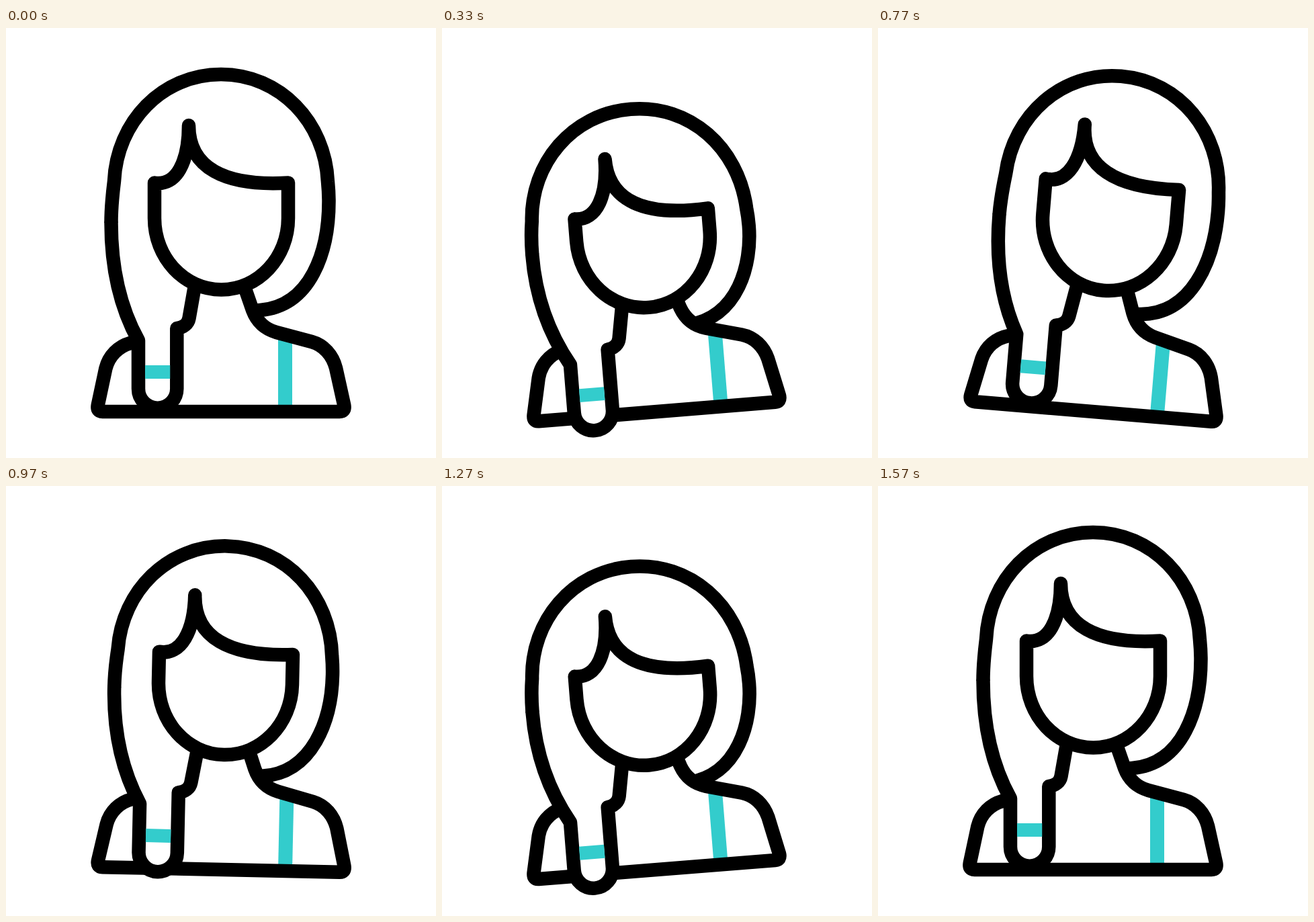
An HTML page that plays this animation: 640 px wide and 640 px high, repeating every 2 s.

```html
<!DOCTYPE html>
<html lang="en">
<head>
<meta charset="utf-8">
<title>Woman</title>
<style>
html, body { margin: 0; height: 100%; overflow: hidden; background: #fff; }
svg { display: block; width: 100vw; height: 100vh; }
.line { fill: none; stroke: #000; stroke-width: 20.5; stroke-linejoin: round; }
.solid { fill: #fff; }
.teal { fill: #33cccc; }
</style>
</head>
<body>
<svg viewBox="0 0 640 640">
  <defs>
    <path id="torso" d="M202 465L185 469C167 474 153 488 148.3 507L136.7 561.5Q135 571 143.5 571H496.5Q505 571 503.3 561.5L491 506C486 487 473 472 455 467L402.5 453C385 448 373 436 367 420L350 371"/>
  </defs>
  <g id="figure">
    <g class="head"><path id="cap" class="line"/></g>
    <use href="#torso" class="solid"/>
    <path class="teal" d="M405 455H426V565H405Z"/>
    <use href="#torso" class="line"/>
    <g class="head">
      <path id="braid" class="line solid" stroke-linecap="round"/>
      <path class="teal" d="M207 502H244.2V522H207Z"/>
      <path id="face" class="line solid"/>
    </g>
  </g>
</svg>
<script>
const $ = id => document.getElementById(id);
const heads = document.querySelectorAll('.head');

// Key poses: time in frames, tilt in degrees, amount of head squash
const FPS = 30, LOOP = 2000;
const keys = [[0, 0, 0], [12, -5, 1], [24, 5, 0], [36, -5, 1], [47, 0, 0]];

function pose(frame) {
  const i = keys.findIndex(k => k[0] > frame);
  if (i < 0) return [0, 0];
  const a = keys[i - 1], b = keys[i];
  const p = (frame - a[0]) / (b[0] - a[0]);
  const e = p * p * (3 - 2 * p);
  return [1, 2].map(n => a[n] + (b[n] - a[n]) * e);
}

function draw(frame) {
  const [tilt, k] = pose(frame);
  $('figure').setAttribute('transform', `rotate(${tilt} 320 571)`);
  heads.forEach(h => h.setAttribute('transform', `translate(0 ${28 * k})`));

  // The crown sinks further than the chin
  const top = 69 + 26 * k, ctrl = 140 + 24 * k, dx = -3 * k;
  const rx = 480.5 - 2 * k, ry = 258 + 24 * k, rside = 229 + 27 * k;
  const lx = 156.5 - 3 * k, ly = 290 + 8 * k, lside = 228 + 21 * k;
  $('cap').setAttribute('d',
    `M364 421L378 420C${454 - 2 * k} 414 ${rx} ${332 + 6 * k} ${rx} ${ry}` +
    `Q${rx} ${ry - 14} ${479 - 2 * k} ${rside}` +
    `C${475 + dx} ${ctrl} ${408 + dx} ${top} ${320 + dx} ${top}` +
    `S${165 + dx} ${ctrl} ${161 - 4 * k} ${lside}` +
    `C${158.5 - 4 * k} ${lside + 20 - 4 * k} ${lx} ${ly - 20} ${lx} ${ly}`);
  $('braid').setAttribute('d',
    `M${lx} ${ly}C${lx} ${360 + 3 * k} ${171 - k} 418 197 465V537` +
    'A28.65 28.65 0 0 0 254.3 537V447C264 446 271 440 272.5 432L282 378');

  const y = 20.5 * k, brow = 230.5 + y, peak = 272 + 1.2 * k;
  $('face').setAttribute('d',
    `M221 ${brow}C254 ${236 + y} ${peak} ${198 + y} ${peak} ${145 + y}` +
    `C${peak} ${208 + y} 325 ${236 + y} 420 ${brow}V283` +
    'C420 342 375.5 389.5 320.5 389.5S221 342 221 283Z');
}

function tick() {
  const t = performance.now() % LOOP;
  draw(Math.floor((t + 4) * FPS / 1000));
  requestAnimationFrame(tick);
}
tick();
</script>
</body>
</html>
```
